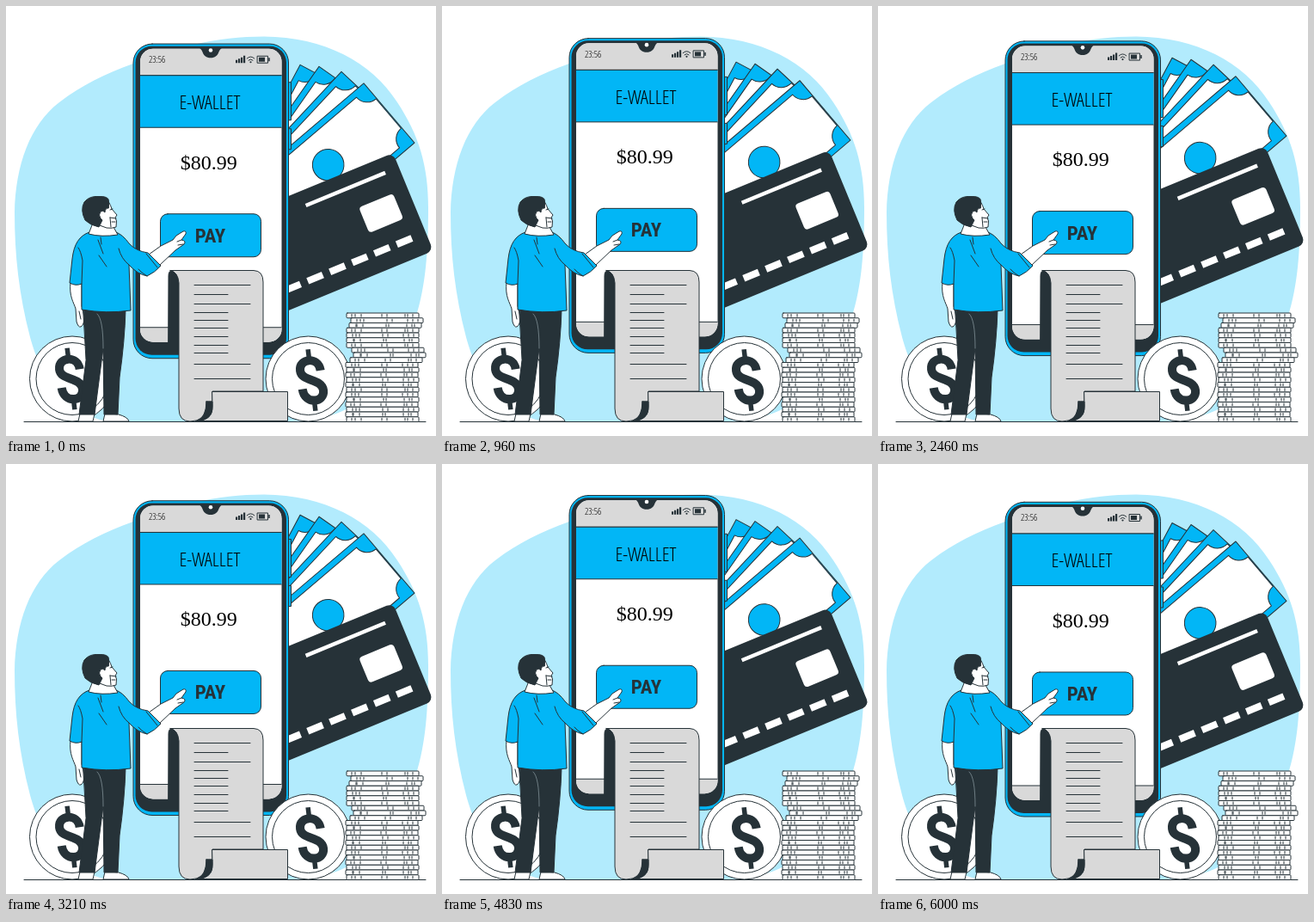
These frames come from a looping animation (500 by 500 pixels, 6040 ms). An HTML page:

```html
<!DOCTYPE html>
<html lang="en">
<head>
<meta charset="utf-8">
<title>E-Wallet</title>
<style>
  html, body { margin: 0; width: 100%; height: 100%; overflow: hidden; background: #fff; }
  svg { display: block; width: 100vw; height: 100vh; }
  .line { stroke: #263238; stroke-width: 1; stroke-linejoin: round; stroke-linecap: round; }
  .blue { fill: #02b6f6; }
  .dark { fill: #263238; }
  .grey { fill: #d9d9d9; }
  .white { fill: #fff; }
  .none { fill: none; }
  .label { font-family: 'Noto Sans', sans-serif; font-stretch: extra-condensed; text-anchor: middle; }
  .price { font: 24px 'Liberation Serif', 'Times New Roman', serif; text-anchor: middle; }
</style>
</head>
<body>
<svg viewBox="0 0 500 500">
  <defs>
    <g id="bill" class="line">
      <path class="blue" d="M0 0V91H-186V0Z"/>
      <path class="white" d="M-17 7A16 16 0 0 0 -1 23V68A16 16 0 0 0 -17 84H-169A16 16 0 0 0 -185 68V23A16 16 0 0 0 -169 7Z"/>
      <circle class="blue" cx="-93" cy="45.5" r="18.3"/>
    </g>
    <g id="coin">
      <circle class="line white" r="49.5"/>
      <circle class="line white" r="42"/>
    </g>
    <g id="dollar" transform="rotate(-7)" fill="none" stroke="#263238">
      <path stroke-width="10" d="M11.500 -10C11 -27 -12 -27 -12 -12.500C-12 1 12 -1 12 13.500C12 28 -11.500 28 -12 9"/>
      <path stroke-width="5.500" d="M0 -36V-22M0 23V36"/>
    </g>
    <clipPath id="screen"><rect x="156" y="50" width="164.500" height="341" rx="15"/></clipPath>
  </defs>

  <path fill="#b2ebfd" d="M10 240C11 185 28 138 62 112C88 92 115 79 148 67C195 48 245 35.500 300 35.500C370 36 425 65 455 112C480 150 491 185 491 235C491 285 488 325 477 360C462 430 410 483 330 483H130C70 483 40 430 28 385C15 335 10 290 10 240Z"/>

  <g id="payment">
    <use href="#bill" transform="translate(342 68.500) rotate(-62)"/>
    <use href="#bill" transform="translate(364 70.500) rotate(-55)"/>
    <use href="#bill" transform="translate(390 76.500) rotate(-47)"/>
    <use href="#bill" transform="translate(416 90) rotate(-40.400)"/>
    <g id="card" transform="translate(450 171) rotate(-22.400)">
      <rect class="dark" x="-190" width="190" height="123" rx="8"/>
      <rect class="white" x="-117" y="15.600" width="100" height="4.500"/>
      <rect class="white" x="-61" y="43.500" width="43" height="32" rx="4"/>
    </g>
  </g>

  <g id="phone">
    <path class="line blue" d="M327 89H331.500V133H327ZM327 143H331.500V167H327Z"/>
    <rect class="line blue" x="148" y="44.300" width="180.500" height="365.700" rx="22"/>
    <rect class="dark" x="150.500" y="47" width="175.500" height="359" rx="19"/>
    <g clip-path="url(#screen)">
      <rect class="white" x="150" y="44" width="180" height="350"/>
      <rect class="line grey" x="150" y="40" width="180" height="41"/>
      <rect class="line blue" x="150" y="81" width="180" height="60.500"/>
      <rect class="line grey" x="150" y="374" width="180" height="30"/>
    </g>
    <path class="dark" d="M224 49C230 50 227 60.500 238 60.500S246 50 252 49Z"/>
    <circle class="white" cx="238" cy="51.800" r="2.300"/>
    <g class="dark">
      <path d="M267 63h2.200v3.500h-2.200zM270 61.500h2.200v5h-2.200zM273 60h2.200v6.500h-2.200zM276 58h2.200v8.500h-2.200z"/>
      <circle cx="284.500" cy="65.500" r="1.100"/>
      <rect x="294" y="60" width="7" height="5"/>
      <rect x="305.300" y="60.500" width="1.500" height="4"/>
    </g>
    <path class="line none" d="M280.200 61.300Q284.500 57.200 288.800 61.300M282 63.400Q284.500 61 287 63.400M292.500 58.500H304.500V66.500H292.500Z"/>
    <text class="label" x="175.700" y="66.500" font-weight="300" data-width="19.500" data-size="11.500">23:56</text>
    <text class="label" x="237" y="120.500" font-weight="300" data-width="71" data-size="24.500">E-WALLET</text>
    <text class="price" x="235.700" y="189.800">$80.99</text>
    <rect class="line blue" x="179.500" y="242" width="117" height="50" rx="8.500"/>
    <text class="label dark" x="237.500" y="275" font-weight="700" data-width="35.500" data-size="25.500">PAY</text>
  </g>

  <path class="line" d="M21 483.500H488"/>

  <use href="#coin" x="77" y="433.500"/>
  <use href="#dollar" x="75.500" y="433.500"/>
  <use href="#coin" x="351.500" y="433.500"/>
  <use href="#dollar" x="355.500" y="435"/>
  <g id="stack" class="line"></g>

  <g id="receipt">
    <path class="line dark" d="M189 313Q189 307.500 194 307.500L202 315V392H189Z"/>
    <path class="line grey" d="M191 307.500H288Q299 308 299 321V448H240V460H233V465Q232 483 214 483Q201 483 201 468V322Q200 309 191 307.500Z"/>
    <path class="line grey" d="M240 448.500H327.500V482.500H222Q240 482 240 466Z"/>
    <path class="line dark" d="M233 460H240V469Q239 482 220 483Q233 480 233 460Z"/>
    <path id="entries" class="line none"/>
  </g>

  <g id="man" class="line">
    <path class="white" d="M75 321C73 338 79 345 81 352L82 367Q84 374 87 373Q91 371 91 361L88 349V321Z"/>
    <path class="none" d="M85 355L87 364"/>
    <path class="white" d="M86 474L84 483H101L103 474ZM115 474L113 483H143Q142 478 131 475Z"/>
    <path class="dark" d="M90 352L139 353Q138 390 132 432L130 475H114L113 398L103 475H85L93 412Z"/>
    <path class="none" style="stroke:#9fb0b8;stroke-width:.6" d="M106 358Q113 364 113 398"/>
    <path class="white" d="M166 289L180 279L194 272L198 267L206 262Q210 261 209 265L204 272Q210 273 207 277L197 284L178 302Z"/>
    <path class="none" d="M204 272L199 274M206 277L200 278"/>
    <path class="blue" d="M97 263C85 267 79 277 77 294L74 322Q81 326 88 323V353Q116 358 145 354L143 301Q153 312 164 314Q173 310 180 302L165 287Q151 285 143 276Q136 266 128 263Z"/>
    <path class="none" d="M88 323L89 296Q87 285 84 281M143 301Q134 294 131 282M107 272L113 288M108 290L117 303M164 314Q157 310 154 306M163 288L176 304M110 269L111 277"/>
    <path class="white" d="M102 250L96 265Q111 269 130 266L125 257Z"/>
    <path class="white" d="M119 227Q122 232 123 236L129 243L127 246L128.500 250L128 257Q123 259 117 258L106 254V236Z"/>
    <path class="dark" d="M119 235Q115 235 115 240Q113 237 110 239Q107 243 110 247L112 249L108 257Q98 255 92 249Q86 237 91 228Q97 220.500 108 221.500Q119 221 119.500 226Z"/>
    <path class="none" d="M121 237L124 236M121 246L128 247M121 246L122 257M123 251H127"/>
  </g>
</svg>
<script>
const LOOP = 6040, PHASE = 40, LIFT = 10;
const $ = id => document.getElementById(id);

function add(parent, tag, attrs) {
  const node = document.createElementNS('http://www.w3.org/2000/svg', tag);
  for (const key in attrs) node.setAttribute(key, attrs[key]);
  return parent.appendChild(node);
}

function buildCard() {
  for (let i = 0; i < 6; i++)
    add($('card'), 'rect', { class: 'white', x: -36.5 - 28 * i, y: 96, width: 19, height: 8 });
}

function buildStack() {
  const shifts = [1, 6, 4, 1, 1, 1, 1, 7, 9, 5];
  const rows = 22, height = 126.5 / rows;
  for (let i = 0; i < rows; i++) {
    const x = 395 + (shifts[i] ?? i % 2), y = 357 + i * height;
    add($('stack'), 'rect', { class: 'white', x, y, width: 84, height, rx: 1 });
    const ticks = [6, 9, 15, 41, 46, 66, 71, 76]
      .map((dx, k) => `M${x + dx + (i * 7 + k) % 3} ${y + 1.5}v${height - 3}`);
    add($('stack'), 'path', { d: ticks.join('') });
  }
}

function buildReceipt() {
  const long = [324, 346, 416, 433], short = [335, 356, 365, 374, 384, 394, 403];
  const rules = (ys, width) => ys.map(y => `M219 ${y + .5}h${width}`).join('');
  $('entries').setAttribute('d', rules(long, 65) + rules(short, 39));
}

// Use the narrowest installed face, at a size that fits the label's space.
function fitLabel(label) {
  const { width, size } = label.dataset;
  label.style.fontSize = size + 'px';
  const measure = family => {
    label.style.fontFamily = `'${family}', sans-serif`;
    return { family, length: label.getComputedTextLength() };
  };
  const best = ['Noto Sans', 'Open Sans', 'Roboto', 'Roboto Condensed']
    .map(measure).sort((a, b) => a.length - b.length)[0];
  measure(best.family);
  label.style.fontSize = size * Math.min(1, width / best.length) + 'px';
}

// Linear rise and fall: 0 at both ends of the period, 1 in the middle.
function wave(time, period) {
  const part = (time % period) / period;
  return 1 - Math.abs(2 * part - 1);
}

function raise(id, amount) {
  $(id).setAttribute('transform', `translate(0 ${(-LIFT * amount).toFixed(3)})`);
}

function draw(now) {
  const time = now + PHASE;
  raise('phone', wave(time, LOOP / 2));
  raise('payment', wave(time, LOOP));
}

function tick(now) {
  draw(now);
  requestAnimationFrame(tick);
}

buildCard();
buildStack();
buildReceipt();
document.querySelectorAll('.label').forEach(fitLabel);
draw(0);
requestAnimationFrame(tick);
</script>
</body>
</html>
```
